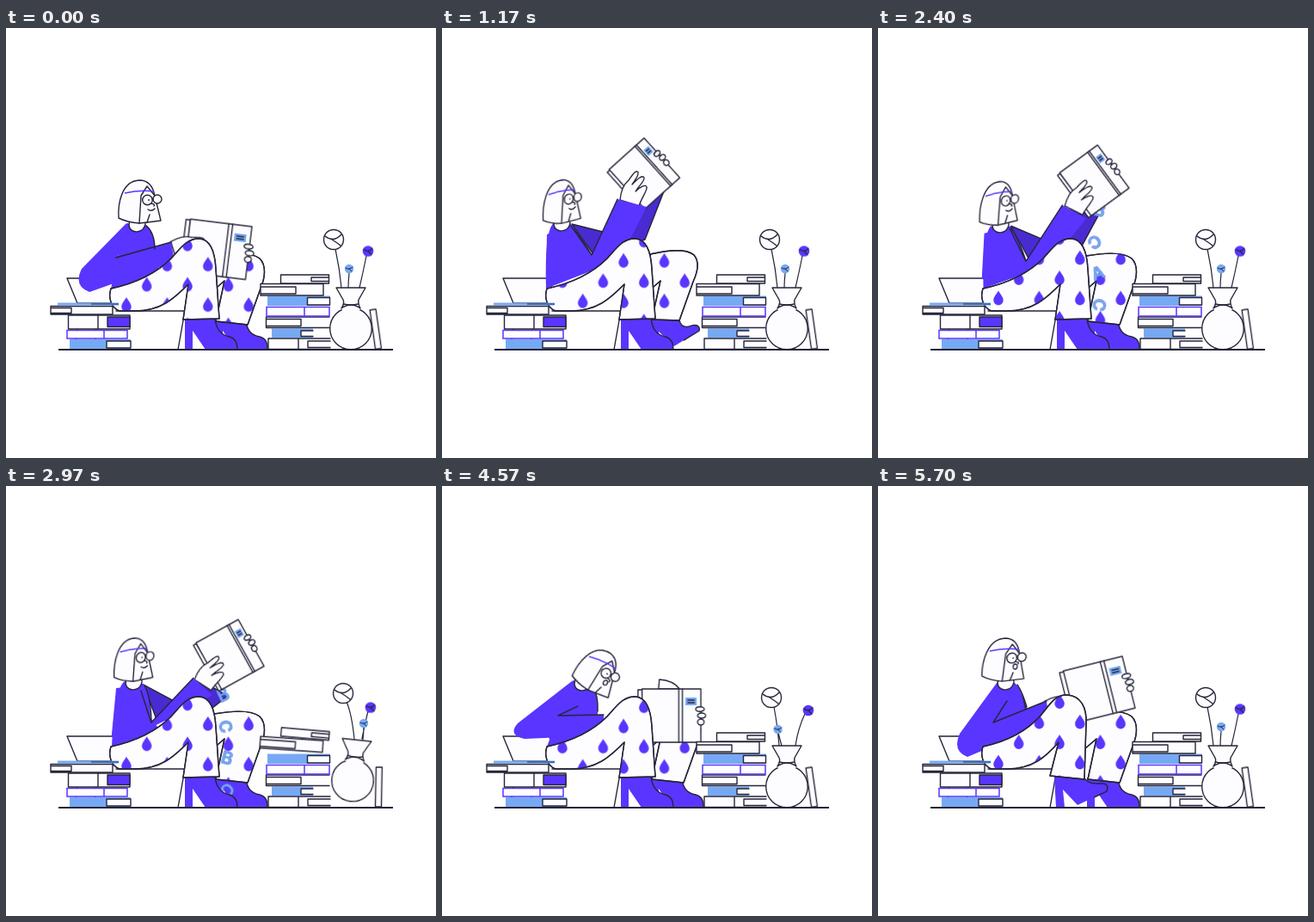
Animation, 500 px wide and 500 px high, one loop 5.73 s. Source, as an HTML page without scripts:

```html
<!DOCTYPE html>
<html lang="en">
<head>
<meta charset="utf-8">
<title>Reading</title>
<style>
html, body { margin: 0; width: 100%; height: 100%; overflow: hidden; background: #fff; }
svg { display: block; width: 100vw; height: 100vh; }
:root { --t: 5.73s; --ink: #25253a; --violet: #5a35ff; --blue: #76a9f4; --go: cubic-bezier(.3,.3,.6,1); }

.ink, .line { stroke: var(--ink); stroke-width: 1.4; stroke-linejoin: round; stroke-linecap: round; vector-effect: non-scaling-stroke; }
.ink { fill: #fdfdff; }
.line { fill: none; }
.v { fill: var(--violet); }
.b { fill: var(--blue); }
.vl { fill: #fdfdff; stroke: var(--violet); stroke-width: 1.5; }

/* body */
.torso, .arm, .crease, .farArm, .head, .collar, .book, .cover, .hand, .nearLeg, .farLeg, .nearShoe, .farShoe,
.vase, .stem, .bloom, .slab, .hopL, .hopR, .screen, .page, .smile, .oh { animation: var(--t) linear infinite; }

.torso { animation-name: torso; }
@keyframes torso {
  0% { d: path("M140 227Q131 260 122 303L180 290L173 258Q173 237 163 229Z"); animation-timing-function: var(--go); }
  20.4% { d: path("M131 226Q119 232 121 303L180 280L174 264Q160 240 150 228Z"); }
  31.9% { d: path("M124 234Q117 245 122 303L180 280L174 270Q160 245 149 231Z"); }
  51.8% { d: path("M138 227Q126 235 123 303L180 285L168 270Q168 240 160 230Z"); }
  65.8% { d: path("M144 226Q135 260 122 303L185 290L177 266Q176 240 168 229Z"); }
  79.8% { d: path("M152 226Q138 260 122 303L188 290L181 266Q182 242 174 232Z"); }
  99.5%, 100% { d: path("M139 227Q125 262 122 303L185 290L170 258Q168 237 159 229Z"); }
}
.arm { animation-name: arm; }
@keyframes arm {
  0% { d: path("M139 228L88 280Q78 300 97 307L196 272L192 249L128 267L165 231Z"); animation-timing-function: var(--go); }
  20.4% { d: path("M122 240L121 290Q124 304 208 266L238 208L204 199L174 264L150 230Z"); }
  31.9% { d: path("M120 242L119 290Q124 306 211 268L243 216L209 203L175 270L149 232Z"); }
  38.4% { d: path("M122 240L120 290Q124 305 208 268L243 214L213 200L173 270L152 232Z"); }
  51.8% { d: path("M128 235L123 290Q125 304 195 268L240 243L218 223L169 275L159 232Z"); }
  65.8% { d: path("M143 226L80 258Q60 272 79 286L185 291L184 266L122 261L168 232Z"); }
  79.8% { d: path("M151 227L88 276Q76 290 96 294L188 290L188 266L135 267L176 235Z"); }
  99.5%, 100% { d: path("M138 229L95 288Q86 308 104 315L199 275L196 250L134 275L162 232Z"); }
}
.crease { animation-name: crease; }
@keyframes crease {
  0% { d: path("M192 249L128 267L130 266M173 257Q173 238 163 230"); animation-timing-function: var(--go); }
  20.4% { d: path("M204 199L174 264L150 230M174 264Q162 244 150 230"); }
  31.9% { d: path("M209 203L175 270L149 232M175 270Q162 248 150 233"); }
  38.4% { d: path("M213 200L173 270L152 232M173 270Q163 248 152 232"); }
  51.8% { d: path("M218 223L169 275L157 238M169 272Q168 244 161 232"); }
  65.8% { d: path("M177 265L122 260L124 260M175 262Q174 241 168 231"); }
  79.8% { d: path("M188 266L135 267L158 256M181 262Q182 243 175 233"); }
  99.5%, 100% { d: path("M196 250L134 275L150 250M173 257Q168 240 162 231"); }
}
.farArm { animation-name: farArm; }
@keyframes farArm {
  0% { d: path("M158 232L168 240L172 256L176 275L168 285L160 270Z"); animation-timing-function: var(--go); }
  20.4% { d: path("M151 228L187 237L230 190L258 190L236 246L178 266Z"); }
  31.9% { d: path("M150 229L187 242L230 205L254 212L238 249L178 272Z"); }
  38.4% { d: path("M153 230L190 244L230 202L256 208L238 250L178 272Z"); }
  51.8% { d: path("M160 231L197 251L225 225L258 244L235 262L176 274Z"); }
  65.8%, 100% { d: path("M160 234L168 245L172 258L176 275L168 285L160 270Z"); }
}
.head { animation-name: head; }
@keyframes head {
  0% { transform: translate(155px,203px) rotate(0deg) skewX(0deg) scaleX(1); animation-timing-function: var(--go); }
  20.4% { transform: translate(139px,203px) rotate(-7deg) skewX(-7deg) scaleX(.9); }
  31.9% { transform: translate(132px,207px) rotate(-9deg) skewX(-10deg) scaleX(.89); }
  51.8% { transform: translate(148px,203px) rotate(-4deg) skewX(-5deg) scaleX(.92); }
  65.8% { transform: translate(164px,206px) rotate(12deg) skewX(0deg) scaleX(1); }
  79.8% { transform: translate(181px,216px) rotate(28deg) skewX(0deg) scaleX(1); }
  99.5%, 100% { transform: translate(146px,203px) rotate(0deg) skewX(-4deg) scaleX(1); }
}
.collar { animation-name: collar; }
@keyframes collar {
  0% { transform: translate(153px,229px); animation-timing-function: var(--go); }
  20.4% { transform: translate(140px,228px); }
  31.9% { transform: translate(137px,231px); }
  51.8% { transform: translate(149px,229px); }
  65.8% { transform: translate(156px,229px); }
  79.8% { transform: translate(164px,230px); }
  99.5%, 100% { transform: translate(149px,229px); }
}
.smile { animation-name: smile; }
@keyframes smile { 0%, 73% { opacity: 1; } 73.1%, 100% { opacity: 0; } }
.oh { animation-name: oh; }
@keyframes oh { 0%, 73% { opacity: 0; } 73.1%, 100% { opacity: 1; } }

/* book in hands */
.book { animation-name: book; }
@keyframes book {
  0% { transform: translate(286px,231px) rotate(7deg) scaleX(1); animation-timing-function: var(--go); }
  20.4% { transform: translate(235px,128px) rotate(-42deg) scaleX(.76); }
  22.7% { transform: translate(236px,125px) rotate(-42deg) scaleX(.75); }
  31.9% { transform: translate(241px,135.5px) rotate(-41deg) scaleX(.72); }
  38.4% { transform: translate(250px,130px) rotate(-38deg) scaleX(.74); }
  42.4% { transform: translate(256px,137px) rotate(-36deg) scaleX(.76); }
  51.8% { transform: translate(270px,155px) rotate(-29deg) scaleX(.78); }
  65.8% { transform: translate(297px,225.5px) rotate(-2deg) scaleX(.99); }
  79.8% { transform: translate(301px,236px) rotate(0deg) scaleX(.95); }
  99.5%, 100% { transform: translate(284px,198px) rotate(-14deg) scaleX(.98); }
}
.cover { animation-name: cover; }
@keyframes cover {
  0%, 65.8%, 100% { transform: none; }
  20.4%, 51.8% { transform: scaleX(.7); }
}
.page { transform-origin: -26px 0; animation-name: page; }
@keyframes page {
  0%, 73% { transform: scaleX(-.9); opacity: 0; }
  73.1% { transform: scaleX(-.9); opacity: 1; }
  79.8% { transform: scaleX(1); opacity: 1; }
  84% { transform: scale(1.7,.1); opacity: 1; }
  84.1%, 100% { transform: scale(1.7,.1); opacity: 0; }
}
.hand { animation-name: hand; }
@keyframes hand {
  0% { transform: translate(196px,260px) rotate(55deg); animation-timing-function: var(--go); }
  20.4% { transform: translate(219px,203px) rotate(0deg); }
  31.9% { transform: translate(225px,208px) rotate(3deg); }
  38.4% { transform: translate(228px,205px) rotate(7deg); }
  51.8% { transform: translate(230px,231px) rotate(15deg); }
  65.8%, 79.8% { transform: translate(195px,285px) rotate(55deg); }
  99.5%, 100% { transform: translate(198px,262px) rotate(55deg); }
}

/* legs */
.nearLeg { animation-name: nearLeg; }
@keyframes nearLeg {
  0%, 92% { d: path("M122 303C150 297 175 285 192 268C203 256 211 244 225 245C238 246 243 262 244 280L248 338L206 339L212 298C195 315 180 329 150 329L132 329C121 325 119 312 122 303Z"); }
  99.5%, 100% { d: path("M122 303C150 297 173 285 189 267C199 255 206 242 220 243C236 244 243 258 242 276L240 341L200 337L210 298C195 315 180 329 150 329L132 329C121 325 119 312 122 303Z"); }
}
.farLeg { animation-name: farLeg; }
@keyframes farLeg {
  0%, 12%, 27%, 54%, 79.8%, 100% { d: path("M242 265C265 261 285 260 295 268C303 276 301 290 297 300L281 345L244 341L254 294L240 306Z"); }
  20.4% { d: path("M242 263C264 258 284 256 293 264C300 272 297 284 292 295L276 340L244 339L254 294L240 306Z"); }
  65.8% { d: path("M242 265C267 261 289 260 300 268C308 276 306 288 301 299L281 345L244 341L254 294L240 306Z"); }
}
/* the dash keeps the outline on the upper edge only */
.shoe { fill: var(--violet); stroke: var(--ink); stroke-width: 1.4; stroke-dasharray: 87 999; }
.nearShoe { animation-name: nearShoe; }
@keyframes nearShoe {
  0%, 92% { d: path("M208 338L243 337C244 350 250 357 260 359C267 361 269 367 269 374L232 374L217 352L217 374L208 374Z"); }
  99.5%, 100% { d: path("M205 337L240 340C246 347 252 346 260 346C267 346 268 350 266 355L232 371L215 353L217 374L207 374Z"); }
}
.farShoe { animation-name: farShoe; }
@keyframes farShoe {
  0%, 12%, 27%, 100% { d: path("M243 340L279 342C281 352 285 357 295 359C303 361 304 367 304 374L267 374L252 352L252 374L243 374Z"); }
  20.4% { d: path("M243 339L276 339C277 347 283 349 290 346C298 344 300 348 299 352L270 370L252 353L252 374L243 374Z"); }
}

/* falling letters */
.fall text { font: 700 20px Inter, Arial, sans-serif; text-anchor: middle; fill: var(--blue); stroke: #4a6fd0; stroke-width: .5; }
.fall g { opacity: 0; animation: fall var(--t) linear infinite; animation-delay: calc(1.79s + .2s * var(--n)); }
@keyframes fall {
  0% { transform: translate(258px,210px); opacity: 1; }
  4% { transform: translate(251px,252px); opacity: 1; }
  8% { transform: translate(257px,294px); opacity: 1; }
  15.7% { transform: translate(257px,375px); opacity: 1; }
  15.8%, 100% { transform: translate(257px,375px); opacity: 0; }
}

/* stacks */
.hopL { animation-name: hopL; transform-origin: 95px 328px; }
@keyframes hopL {
  0%, 25%, 40%, 100% { transform: none; }
  25% { animation-timing-function: ease-out; }
  31.9% { transform: translateY(var(--h)) rotate(var(--r, 0deg)); animation-timing-function: ease-in; }
}
.hopR { animation-name: hopR; transform-origin: 345px 296px; }
@keyframes hopR {
  0%, 44%, 59%, 100% { transform: none; }
  51.8% { transform: translateY(var(--h)) rotate(var(--r)); }
}
.screen { animation-name: screen; }
@keyframes screen {
  0%, 25%, 40%, 100% { d: path("M71 291L125 291L132 320L83 320Z"); }
  31.9% { d: path("M67 298L128 299L131 304L72 308Z"); }
}

/* vase */
.vase { transform-origin: 401px 350px; animation-name: vase; }
@keyframes vase {
  0%, 43%, 79.8%, 100% { transform: none; }
  51.8% { transform: translate(2px,-7px) rotate(6deg); }
  65.8% { transform: translate(-1px,0) rotate(-4deg); }
}
.stem { animation-name: stem; }
@keyframes stem {
  0%, 43%, 88%, 100% { d: path("M390 302Q388 280 383 257M398 302Q398 295 399 285M411 302Q415 285 419 265"); }
  51.8% { d: path("M405 294Q402 265 396 251M415 295Q416 288 416 280M414 294Q417 278 421 262"); }
  65.8% { d: path("M404 303Q406 280 406 257M397 303Q397 292 398 285M390 303Q389 285 388 264"); }
  79.8% { d: path("M392 302Q390 278 386 257M395 302Q393 295 391 287M411 302Q414 282 422 265"); }
}
.bloom { animation-name: bloom; }
@keyframes bloom {
  0%, 43%, 88%, 100% { transform: translate(var(--a)); }
  51.8% { transform: translate(var(--b)); }
  65.8% { transform: translate(var(--c)); }
  79.8% { transform: translate(var(--d)); }
}
.slab { transform-origin: 433px 373px; animation-name: slab; }
@keyframes slab {
  0%, 43%, 79%, 100% { transform: rotate(-8deg); }
  51.8% { transform: rotate(1deg); }
  65.8% { transform: rotate(12deg); }
  70% { transform: rotate(14deg); }
}
</style>
</head>
<body>
<svg viewBox="0 0 500 500">
  <defs>
    <path id="drop" class="v" d="M0-9C2-5 5.7-2 5.7 2.3A5.7 5.7 0 0 1-5.7 2.3C-5.7-2-2-5 0-9Z"/>
    <pattern id="drops" patternUnits="userSpaceOnUse" width="47.4" height="47" patternTransform="translate(128.15 251.5)">
      <use href="#drop" x="11.85" y="23.5"/>
      <use href="#drop" x="35.55"/>
      <use href="#drop" x="35.55" y="47"/>
      <animateTransform attributeName="patternTransform" type="translate" from="128.15 251.5" to="128.15 298.5" dur="2.865s" repeatCount="indefinite"/>
    </pattern>
  </defs>

  <!-- bench and laptop lid -->
  <path class="line" d="M128 329H208L200 374M84 334L80 374M106 334L103 374"/>
  <path class="ink screen"/>

  <!-- far side -->
  <path class="farArm line" style="fill:#4a2bd2"/>
  <path class="farShoe shoe"/>
  <path class="ink farLeg"/>
  <path class="line farLeg" style="fill:url(#drops)"/>

  <g class="fall">
    <g style="--n:0"><text y="7" transform="rotate(100)">C</text></g>
    <g style="--n:1"><text y="7" transform="rotate(-20)">A</text></g>
    <g style="--n:2"><text y="7" transform="rotate(140)">C</text></g>
    <g style="--n:3"><text y="7" transform="rotate(15)">B</text></g>
    <g style="--n:4"><text y="7" transform="rotate(75)">C</text></g>
    <g style="--n:5"><text y="7" transform="rotate(-25)">B</text></g>
    <g style="--n:5.8"><text y="7" transform="rotate(90)">C</text></g>
  </g>
  <path class="nearShoe shoe"/>

  <path class="torso v"/>

  <g class="book">
    <path class="ink page" d="M-26 0Q-34-10-51-11L-52 0Z"/>
    <path class="ink" d="M-72 1H-77V62H-70Z"/>
    <path class="ink" d="M-72 0H0V62H-72Z"/>
    <g class="cover">
      <path class="line" d="M-27 0V62M-22.500 0V62"/>
      <path class="b" d="M-19 10H-5V19H-19Z"/>
      <path class="line" d="M-16 13H-8M-16 16H-8"/>
    </g>
    <ellipse class="ink" cx="-1" cy="23.500" rx="5.200" ry="2.700"/>
    <ellipse class="ink" cx="1" cy="31" rx="5" ry="3"/>
    <ellipse class="ink" cx="0" cy="38.500" rx="4" ry="3.400"/>
  </g>

  <path class="ink hand" d="M-12-3C-11-14-8-21-2-26C3-33 7-39 9-35C10-31 5-26 2-21C8-27 14-33 16-29C17-25 10-20 6-13C11-18 18-22 19-18C20-14 13-6 10 4Z"/>
  <path class="arm v"/>
  <path class="line crease"/>

  <path class="ink nearLeg"/>
  <path class="line nearLeg" style="fill:url(#drops)"/>

  <path class="ink collar" d="M-9-8L-10 1C-8 11 7 10 9-1L8-8Z"/>
  <g class="head">
    <path class="ink" d="M-24 18C-25 2-21-25 0-26C11-26 16-18 18-8L25 21L9 23L0 24Q-14 23-24 18Z"/>
    <path class="line" d="M2-8L0 24M2-8L9-19L18-8M9 23L12 14"/>
    <path d="M-17-11Q0-15 17-13" fill="none" stroke="var(--violet)" stroke-width="1.500"/>
    <circle class="ink" cx="9.500" cy="-3" r="5.800"/>
    <circle class="ink" cx="21" cy="-4" r="5"/>
    <path class="line" d="M15-4L16-4M14 1Q19 2 17 4"/>
    <circle cx="11" cy="-3" r=".9" fill="var(--ink)"/>
    <path class="line smile" d="M10 8Q14 11 18 7"/>
    <ellipse class="ink oh" cx="14" cy="7" rx="2.400" ry="3"/>
  </g>

  <!-- left stack -->
  <g class="hopL" style="--h:-5px">
    <path class="b" d="M74 362H145V373H74Z"/>
    <path class="ink" d="M117 364H145V372H117Z"/>
  </g>
  <g class="hopL" style="--h:-9px">
    <path class="vl" d="M71 351.500H141V361H71ZM114 351.500V361"/>
  </g>
  <g class="hopL" style="--h:-13px">
    <path class="ink" d="M72.500 334H144V350H72.500ZM107 334V350"/>
    <path class="ink" style="fill:var(--violet)" d="M118 336H144V347.500H118Z"/>
  </g>
  <g class="hopL" style="--h:-14px;--r:-3deg">
    <path class="ink" d="M52 323.500H124V333H52ZM52 325.500H76V331.500H52Z"/>
    <path d="M60 321H131" stroke="var(--blue)" stroke-width="3"/>
    <path d="M99 321H131" stroke="#456cae" stroke-width="2"/>
  </g>

  <!-- right stack -->
  <path class="ink" d="M377 361H305V373.500H377M340 361V373M377 364H351V371.500H377"/>
  <path class="b" d="M309 349.500H357V360H309Z"/>
  <path class="ink" d="M357 352H343V358.500H357"/>
  <path class="ink" d="M376 336H302.500V348.500H376M302.500 338.500H343V346.500H302.500"/>
  <path class="vl" d="M303 324.500H376V335H303ZM347 324.500V335"/>
  <path class="b" d="M304 311.500H377V323H304Z"/>
  <path class="ink" d="M350.500 313.500H376.500V322H350.500Z"/>
  <g class="hopR" style="--h:-3px;--r:4deg">
    <path class="ink" d="M296 297.500H369V311H296ZM296 301H337V309H296Z"/>
  </g>
  <g class="hopR" style="--h:-4px;--r:5deg">
    <path class="ink" d="M319.500 287H375.500V297H319.500ZM355 290H375.500V294.500H355Z"/>
  </g>

  <!-- flowers and vase -->
  <path class="line stem" style="stroke-width:1.200"/>
  <g class="bloom" style="--a:381px,246px;--b:392px,241px;--c:407px,245px;--d:383px,246px">
    <circle class="ink" r="11.500"/>
    <path class="line" d="M-10-4Q0 4 9-6M-2 0Q3 3 8 7"/>
  </g>
  <g class="bloom" style="--a:399px,280px;--b:416px,276px;--c:398px,280px;--d:390.500px,283px">
    <circle class="b" r="5.200"/>
    <path class="line" style="stroke-width:1" d="M-4-1Q0 2 4-2M0 0L3 3"/>
  </g>
  <g class="bloom" style="--a:421px,259.500px;--b:424px,257.500px;--c:388px,259px;--d:426px,261px">
    <circle class="v" r="6.300"/>
    <path class="line" style="stroke-width:1.200" d="M-5-2Q0 2 5-3M0 0L4 4"/>
  </g>
  <g class="vase">
    <circle class="ink" cx="401" cy="349.500" r="24.300"/>
    <path class="ink" d="M384 302H418L410 316Q409 320 412 326Q401 318 390 326Q394 320 392 316Z"/>
    <path d="M390 327Q401 319 412 327L408 331H394Z" fill="#fdfdff"/>
    <path class="line" d="M392.500 321Q401 323 409.500 321"/>
  </g>
  <path class="ink slab" d="M429.500 327H436.500V373H429.500Z"/>

  <path d="M61 374H450" stroke="var(--ink)" stroke-width="1.800"/>
</svg>
</body>
</html>
```
